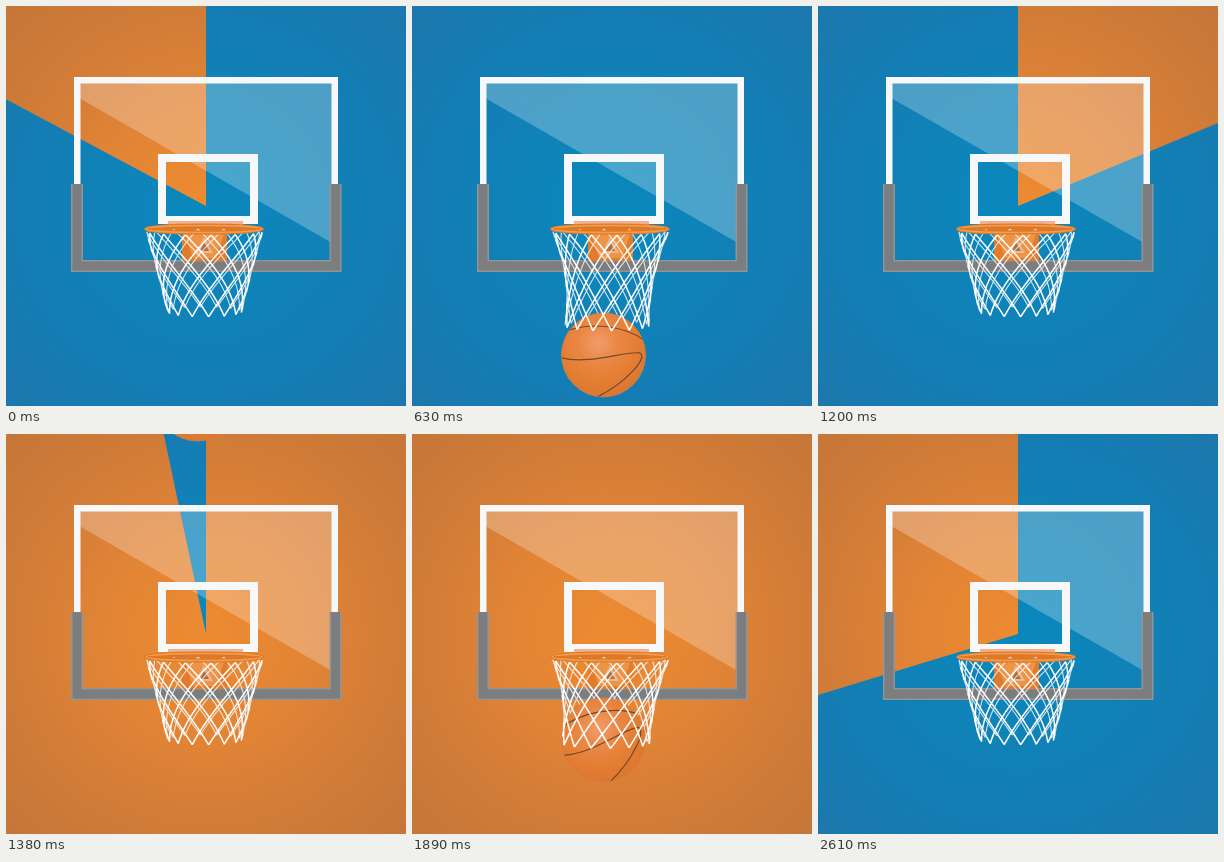
An HTML page with a canvas for the animation above (2640 ms loop, 400 px wide and 400 px high).

```html
<!DOCTYPE html>
<html lang="en">
<head>
<meta charset="utf-8">
<title>Basketball hoop</title>
<style>
html, body { margin: 0; width: 100%; height: 100%; overflow: hidden; background: #1280b5; }
canvas { display: block; width: 100vw; height: 100vh; }
</style>
</head>
<body>
<canvas id="stage" width="400" height="400"></canvas>
<script>
const ctx = document.getElementById('stage').getContext('2d');
const TAU = Math.PI * 2;
const HALF = 1320, LEAD = 240, STEP = 30;

function radial(x, y, r, ...colors) {
  const g = ctx.createRadialGradient(x, y, 0, x, y, r);
  colors.forEach((c, i) => g.addColorStop(i / (colors.length - 1), c));
  return g;
}
const blue = radial(200, 200, 283, '#0988bd', '#0f83b8', '#147db3', '#1c77ac');
const orange = radial(200, 200, 283, '#ee8b31', '#e38535', '#d27c38', '#c57638');

// Smooth hump: 1 at the middle, 0 beyond the reach
const hump = (t, middle, reach) =>
  Math.abs(t - middle) < reach ? (1 + Math.cos(Math.PI * (t - middle) / reach)) / 2 : 0;

function wipeAngle(t) {
  if (t >= 128) return TAU;
  return t < -65
    ? Math.PI * ((t + LEAD) / 175) ** 2.6
    : TAU - Math.PI * ((128 - t) / 193) ** 2.6;
}

function ballHeight(t) {
  const s = t - 300;
  return 125 + 0.653 * s + 2.34e-7 * s ** 3;
}

function netPose(t) {
  const belly = hump(t, 575, 160);
  const pull = hump(t, 630, 90);
  const recoil = hump(t, 900, 200);
  return {
    length: 80 + 14 * pull - 18 * recoil,
    middle: 47 - 3 * pull,
    end: 37 + 7 * belly - 17 * recoil,
    sway: 3 * recoil - 5 * belly
  };
}

function rect(x, y, w, h, color) {
  ctx.fillStyle = color;
  ctx.fillRect(x, y, w, h);
}

function trace(points) {
  ctx.beginPath();
  points.forEach(([x, y]) => ctx.lineTo(x, y));
}

function poly(points, color) {
  trace(points);
  ctx.fillStyle = color;
  ctx.fill();
}

function stroke(color, width) {
  ctx.strokeStyle = color;
  ctx.lineWidth = width;
  ctx.stroke();
}

function frame(x, y, w, h, line) {
  ctx.beginPath();
  ctx.rect(x + line / 2, y + line / 2, w - line, h - line);
  stroke('#f7f8fa', line);
}

function background(t, next, old) {
  rect(0, 0, 400, 400, old);
  ctx.beginPath();
  ctx.moveTo(200, 200);
  ctx.arc(200, 200, 300, -TAU / 4, wipeAngle(t) - TAU / 4);
  ctx.fillStyle = next;
  ctx.fill();
}

function board() {
  poly([[74, 77], [326, 77], [326, 237], [74, 92.5]], 'rgba(255,255,255,.25)');
  frame(68, 71, 264, 190, 6.5);
  frame(152, 148, 100, 70, 8);

  trace([[71, 178], [71, 260], [329.5, 260], [329.5, 178]]);
  stroke('#929495', 12);
  stroke('#7b7d7e', 9);
}

function bracket() {
  rect(162, 215, 75, 5, '#f3b08e');
  rect(176, 226, 45, 29, '#e27c2a');
  poly([[179, 228], [218, 228], [210, 252], [187, 252]], '#ee9446');
  poly([[198, 231], [207, 247], [190, 247]], '#e9b894');
  poly([[198, 236], [203, 245], [194, 245]], '#b0703f');
}

function rim(front) {
  ctx.beginPath();
  ctx.ellipse(198, 223, 58, 3.5, 0, front ? 0 : Math.PI, front ? Math.PI : TAU);
  if (!front) {
    ctx.fillStyle = '#dd7a2a';
    ctx.fillRect(142, 221, 112, 5);
  }
  stroke('#dd7926', 4);
  stroke('#f39d50', 1.5);
}

function net(pose, front) {
  const count = 14, steps = 24, twist = 3 * TAU / count;
  const point = (angle, v) => {
    const half = 58 * (1 - v) * (1 - 2 * v) + pose.middle * 4 * v * (1 - v) + pose.end * v * (2 * v - 1);
    return [198.5 + pose.sway * v * v + half * Math.cos(angle),
      226 + pose.length * v + (3 + 2 * v) * Math.sin(angle)];
  };
  ctx.beginPath();
  for (let i = 0; i < count; i++) {
    for (const dir of [-1, 1]) {
      const angle = v => (i + .25) * TAU / count + dir * twist * v;
      for (let k = 0; k < steps; k++) {
        const v = k / steps, w = (k + 1) / steps;
        if (Math.sin(angle((v + w) / 2)) > 0 !== front) continue;
        ctx.moveTo(...point(angle(v), v));
        ctx.lineTo(...point(angle(w), w));
      }
    }
  }
  stroke(front ? '#fff' : 'rgba(242,245,248,.85)', front ? 1.5 : 1.1);
}

function ball(t) {
  const r = 42;
  ctx.save();
  ctx.translate(191.5, ballHeight(t));
  ctx.beginPath();
  ctx.arc(0, 0, r, 0, TAU);
  ctx.fillStyle = radial(-5, -12, 60, '#f19c6c', '#ea8744', '#e37d32', '#d87431');
  ctx.fill();
  stroke('rgba(215,125,65,.8)', 1);
  ctx.clip();
  ctx.rotate((t - 630) * .005);
  ctx.beginPath();
  ctx.moveTo(-r, 3);
  ctx.bezierCurveTo(-15, 10, 22, -4, 36, -2);
  ctx.bezierCurveTo(46, 2, 22, 28, -6, r);
  ctx.moveTo(-34, -25);
  ctx.bezierCurveTo(-12, -32, 20, -30, r, -14);
  stroke('#74492c', 1.2);
  ctx.restore();
}

function draw(now) {
  const u = (Math.floor(now / STEP) * STEP + LEAD) % (2 * HALF);
  const t = u % HALF - LEAD;
  const pose = netPose(t);

  background(t, ...(u < HALF ? [blue, orange] : [orange, blue]));
  board();
  bracket();
  rim(false);
  net(pose, false);
  ball(t);
  net(pose, true);
  rim(true);
}

const begin = performance.now();
function tick() {
  draw(performance.now() - begin);
  requestAnimationFrame(tick);
}
tick();
</script>
</body>
</html>
```
